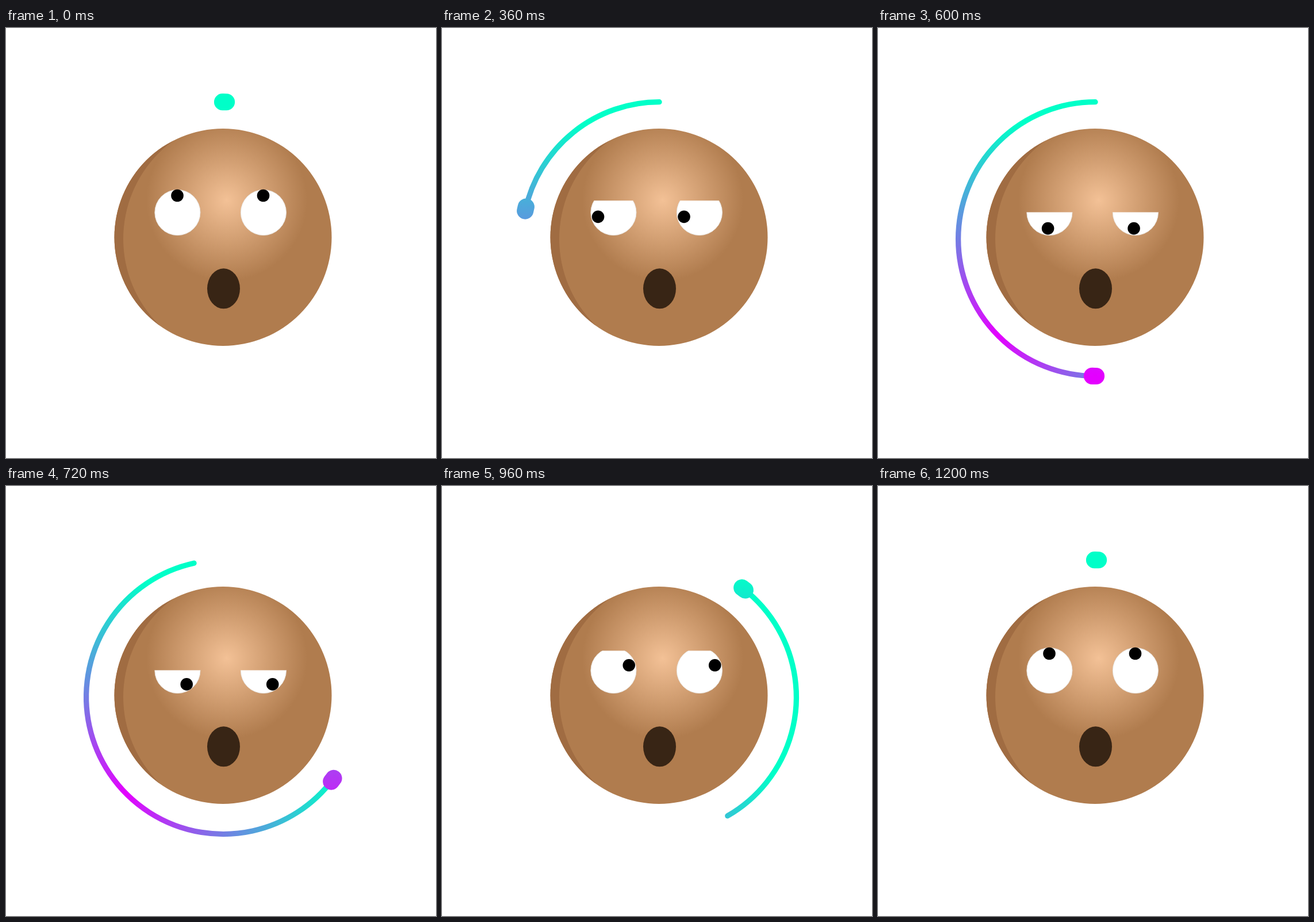
An HTML page with a canvas for the animation above (1.23 s loop, 748 by 748 pixels).

```html
<!DOCTYPE html>
<html lang="en">
<head>
<meta charset="utf-8">
<title>Rolling eyes</title>
<style>
  html, body { margin: 0; width: 100%; height: 100%; overflow: hidden; background: #fff; }
  canvas { display: block; }
</style>
</head>
<body>
<canvas id="stage" width="748" height="748"></canvas>
<script>
const ctx = document.getElementById('stage').getContext('2d');
const TAU = Math.PI * 2;
const LOOP = 1230, STEP = 30, TURN = 1200;

const ring = { x: 378, y: 367.1, r: 238.4 };
const face = { x: 377.5, y: 364, r: 189 };
const eye = { y: 321, r: 39.6, xs: [298.4, 447.9] };

// Pupil path of the left eye: [time, x, y]
const pupilPath = [
  [0, 298, 291.5], [240, 272.2, 311.2], [480, 278.5, 343.2], [720, 314.2, 344.9],
  [840, 325.6, 329.8], [960, 325.2, 311.8], [1080, 313, 299.8], [1200, 298, 291.5]
];

function gradient(g, from, to) {
  g.addColorStop(0, from);
  g.addColorStop(1, to);
  return g;
}
const MAGENTA = '#e400ff', CYAN = '#00ffc8';
const skin = gradient(ctx.createRadialGradient(384, 300, 0, 384, 300, 140), '#f3c196', '#b07c4e');
const trailPaint = gradient(ctx.createRadialGradient(209, 535, 0, 209, 535, 370), MAGENTA, CYAN);
const ballPaint = gradient(ctx.createLinearGradient(0, 605, 0, 155), MAGENTA, CYAN);

// Eased progress of t between two times
function ease(t, start, end) {
  const p = Math.min(1, Math.max(0, (t - start) / (end - start)));
  return p * p * (3 - 2 * p);
}

function disc(x, y, r, fill) {
  ctx.beginPath();
  ctx.arc(x, y, r, 0, TAU);
  ctx.fillStyle = fill;
  ctx.fill();
}

// Arc of the ring; turns run anticlockwise from the top
function ringArc(from, to, width, paint) {
  if (to - from < 1e-4) return;
  const angle = turn => -TAU / 4 - turn * TAU;
  ctx.beginPath();
  ctx.arc(ring.x, ring.y, ring.r, angle(from), angle(to), true);
  ctx.lineWidth = width;
  ctx.lineCap = 'round';
  ctx.strokeStyle = paint;
  ctx.stroke();
}

// Smooth closed curve through the timed points
function pupilAt(t) {
  const n = pupilPath.length - 1;
  let i = 0;
  while (i < n - 1 && t >= pupilPath[i + 1][0]) i++;
  const span = k => pupilPath[k + 1][0] - pupilPath[k][0];
  const slope = (k, axis) => (pupilPath[k + 1][axis] - pupilPath[k][axis]) / span(k);
  const speed = (k, axis) => {
    const a = (k + n - 1) % n, b = k % n;
    return (slope(a, axis) * span(b) + slope(b, axis) * span(a)) / (span(a) + span(b));
  };
  const h = span(i), u = Math.min(1, (t - pupilPath[i][0]) / h);
  const s = u * u * (3 - 2 * u);
  return [1, 2].map(axis =>
    pupilPath[i][axis] * (1 - s) + pupilPath[i + 1][axis] * s +
    h * u * (1 - u) * ((1 - u) * speed(i, axis) - u * speed(i + 1, axis)));
}

function drawFace() {
  disc(face.x, face.y, face.r, skin);
  ctx.save();
  ctx.beginPath();
  ctx.arc(face.x, face.y, face.r, 0, TAU);
  ctx.clip();
  ctx.beginPath();
  ctx.rect(0, 0, 748, 748);
  ctx.arc(415, 366.8, 211, 0, TAU);
  ctx.fillStyle = '#a06c42';
  ctx.fill('evenodd');
  ctx.restore();

  ctx.beginPath();
  ctx.ellipse(378.5, 453.3, 28.5, 35, 0, 0, TAU);
  ctx.fillStyle = '#382515';
  ctx.fill();
}

function drawEyes(t) {
  const shut = ease(t, 240, 480) - ease(t, 780, 1020);
  const lidY = 280.2 + 40.3 * shut;
  ctx.save();
  ctx.beginPath();
  ctx.rect(0, lidY, 748, 748);
  ctx.clip();
  for (const x of eye.xs) {
    disc(x, eye.y, eye.r, '#fff');
    ctx.lineWidth = 0.9;
    ctx.strokeStyle = '#e4dfda';
    ctx.stroke();
  }
  ctx.restore();

  const [px, py] = pupilAt(t);
  for (const x of eye.xs) disc(px + x - eye.xs[0], py, 10.8, '#000');
}

function draw(t) {
  ctx.fillStyle = '#fff';
  ctx.fillRect(0, 0, 748, 748);
  drawFace();
  drawEyes(t);
  const lead = ease(t, 0, TURN);
  ringArc(ease(t, 660, TURN), lead, 9.3, trailPaint);
  ringArc(lead - 0.0037, lead + 0.001, 29.2, ballPaint);
}

const began = performance.now();
function tick() {
  const t = (performance.now() - began) % LOOP;
  draw(Math.floor(t / STEP) * STEP);
  requestAnimationFrame(tick);
}
tick();
</script>
</body>
</html>
```
